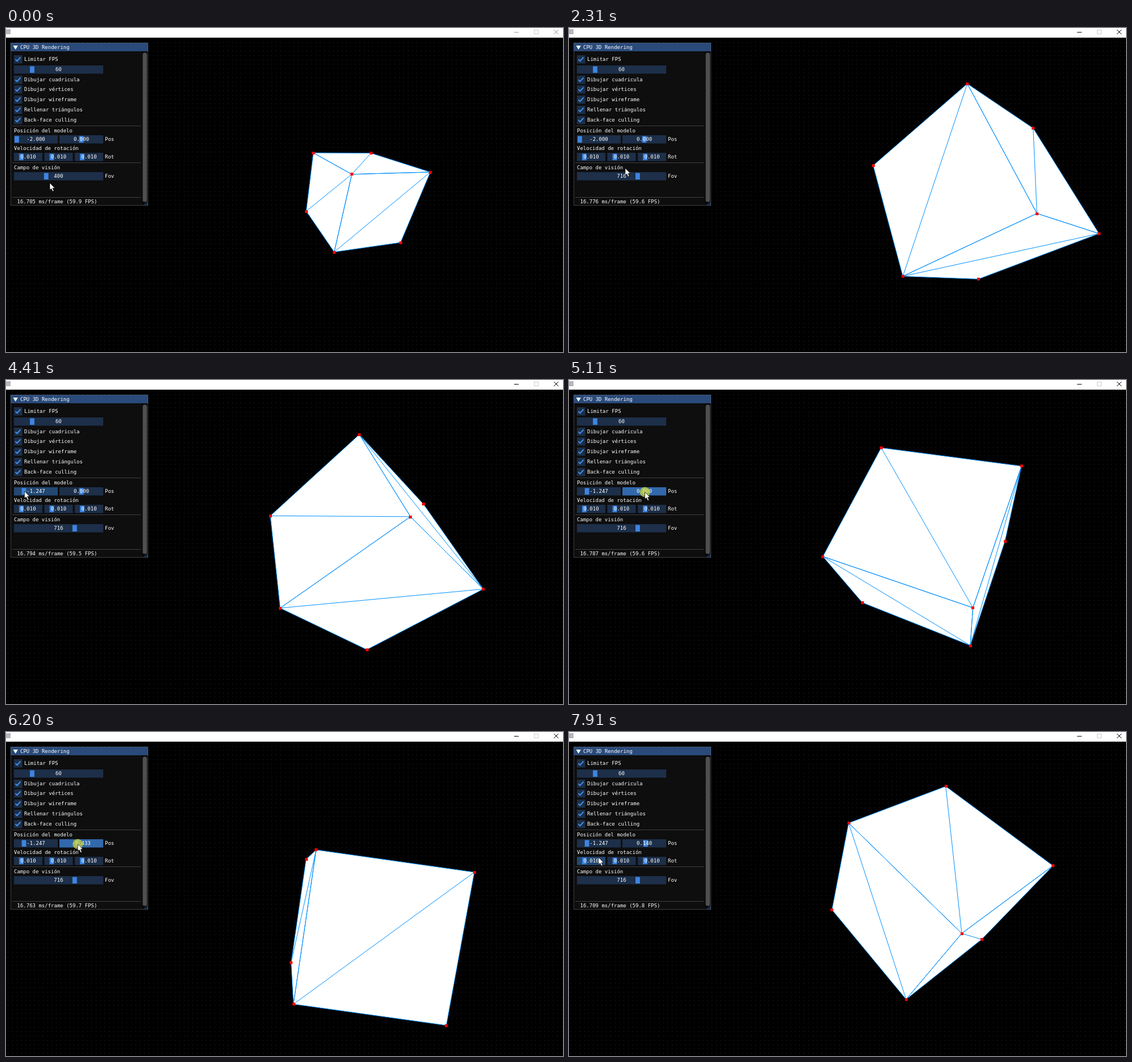
An HTML page with a canvas for the animation above (8000 ms loop, 980 by 571 pixels).

```html
<!DOCTYPE html>
<html lang="es">
<head>
<meta charset="utf-8">
<title>CPU 3D Rendering</title>
<style>
html, body { margin: 0; width: 100%; height: 100%; overflow: hidden; background: #000; }
canvas { display: block; }
</style>
</head>
<body>
<canvas id="stage" width="980" height="571"></canvas>
<script>
const W = 980, H = 571, LOOP = 8000, STEP = 100;
const SCALE = 0.7733, CX = 490.5, CY = 295.7, BAR = 17;
const BORDER = 'rgba(110,110,128,0.5)';
const ctx = document.getElementById('stage').getContext('2d');

const clamp = p => Math.min(1, Math.max(0, p));
const smooth = (t, from, to) => {
  const p = clamp((t - from) / (to - from));
  return p * p * (3 - 2 * p);
};
const easeOut = (t, from, to) => 1 - (1 - clamp((t - from) / (to - from))) ** 2;

// Everything shown at time t: slider values, cube angle, mouse.
function stateAt(t) {
  const fov = 400 + 316 * easeOut(t, 750, 1545);
  const posX = -2 + 0.753 * easeOut(t, 3250, 3800);
  const posY = 0.744 * smooth(t, 5200, 5600) - 1.52 * smooth(t, 5750, 6400) + 0.916 * smooth(t, 6450, 6850);
  const knobs = {
    fov: 70.7 + (fov - 400) * 0.1588,
    posX: 19 + (posX + 2) * 16.7,
    posY: 132.5 + posY * 16.7
  };

  let mouse = [77, 273];
  const moveTo = (x, y, from, to) => {
    const p = smooth(t, from, to);
    mouse = [mouse[0] + (x - mouse[0]) * p, mouse[1] + (y - mouse[1]) * p];
  };
  moveTo(knobs.fov + 1, 262, 100, 600);
  moveTo(knobs.posX + 1, 196, 2100, 2750);
  moveTo(knobs.posY + 1, 197.5, 4450, 4950);
  moveTo(52, 221, 7250, 7800);

  const during = (from, to) => t >= from && t < to;
  const pressed = during(650, 1850) ? 'fov' : during(3200, 3950) ? 'posX' : during(5100, 7150) ? 'posY' : null;
  return {
    fov, posX, posY, knobs, mouse, pressed,
    angle: 4.204 + 0.0006 * t,
    frameMs: 16.705 + 0.09 * Math.sin(Math.PI * t / LOOP),
    focused: t >= 650
  };
}

function rect(x, y, w, h, color) {
  ctx.fillStyle = color;
  ctx.fillRect(x, y, w, h);
}

function path(points, close) {
  ctx.beginPath();
  points.forEach(([x, y]) => ctx.lineTo(x, y));
  if (close) ctx.closePath();
}

function shape(points, color) {
  path(points, true);
  ctx.fillStyle = color;
  ctx.fill();
}

function line(points, color, width = 1) {
  path(points);
  ctx.strokeStyle = color;
  ctx.lineWidth = width;
  ctx.stroke();
}

function text(str, x, y, align = 'left') {
  ctx.font = '9px "DejaVu Sans Mono", monospace';
  ctx.textAlign = align;
  ctx.fillStyle = '#fff';
  ctx.fillText(str, x, y + 3.3);
}

function makeGrid() {
  const grid = document.createElement('canvas'), gap = 10 * SCALE;
  grid.width = W;
  grid.height = H;
  const g = grid.getContext('2d');
  g.fillStyle = '#303030';
  for (let y = BAR; y < H; y += gap)
    for (let x = CX - 640 * SCALE; x < W; x += gap) g.fillRect(Math.round(x), Math.round(y), 1, 1);
  return grid;
}

// Corners are numbered by the bits x, y, z; each face is split from its first to its third corner.
function makeFaces() {
  const faces = [];
  for (let axis = 0; axis < 3; axis++)
    for (const side of [0, 1]) {
      const u = 1 << (axis + 1) % 3, v = 1 << (axis + 2) % 3;
      const face = [0, u, u + v, v].map(i => i + (side << axis));
      if ((side === 1) === (axis === 0)) face.push(face.shift());
      faces.push(face);
    }
  return faces;
}

const GRID = makeGrid(), FACES = makeFaces();

function rotate([x, y, z], angle) {
  const s = Math.sin(angle), c = Math.cos(angle);
  [y, z] = [y * c - z * s, y * s + z * c];
  [x, z] = [x * c - z * s, x * s + z * c];
  [x, y] = [x * c - y * s, x * s + y * c];
  return [x, y, z];
}

function drawCube({ angle, fov, posX, posY }) {
  const focal = fov * SCALE, center = [-posX, -posY, 5];
  const corners = [...Array(8).keys()].map(i =>
    rotate([i & 1, i >> 1 & 1, i >> 2].map(b => 2 * b - 1), angle).map((v, k) => v + center[k]));
  const points = corners.map(([x, y, z]) => [CX + focal * x / z, CY + focal * y / z]);
  const visible = FACES.filter(face => {
    const mid = center.map((_, k) => face.reduce((sum, i) => sum + corners[i][k], 0) / 4);
    return mid.reduce((dot, v, k) => dot + v * (v - center[k]), 0) < 0;
  });

  ctx.save();
  ctx.beginPath();
  ctx.rect(0, BAR, W, H - BAR);
  ctx.clip();
  for (const face of visible) shape(face.map(i => points[i]), '#fff');
  for (const face of visible)
    line([...face, face[0], face[2]].map(i => points[i]), '#0090ff');
  for (const i of new Set(visible.flat()))
    rect(Math.round(points[i][0] - 2.3), Math.round(points[i][1] - 2.3), 5, 5, '#f00');
  ctx.restore();
}

function drawTitleBar(focused) {
  const ink = focused ? '#000' : '#999';
  rect(0, 0, W, BAR, '#fff');
  rect(0, 2, 8, 9, '#b4b8bc');
  line([[894, 7.5], [902, 7.5]], ink);
  ctx.strokeStyle = '#ccc';
  ctx.strokeRect(929.5, 3.5, 7, 7);
  line([[964, 3], [972, 11]], ink);
  line([[972, 3], [964, 11]], ink);
}

function drawCheckbox(label, y) {
  rect(14, y - 7, 14.5, 14.5, '#1d2f49');
  line([[16.5, y + 0.3], [19.5, y + 3.2], [25.5, y - 3.4]], '#4296fa', 1.8);
  text(label, 32, y);
}

function drawSlider(id, x, y, w, value, knob, { mouse, pressed }) {
  const inside = mouse[0] >= x && mouse[0] < x + w && Math.abs(mouse[1] - y) <= 7;
  const active = pressed === id, hover = !pressed && inside;
  rect(x, y - 7, w, 14.5, active ? '#3169ac' : hover ? '#234872' : '#1d2f49');
  rect(knob - 3.9, y - 5.5, 7.8, 11.5, active ? '#4296fa' : '#3d85e0');
  text(value, x + w / 2, y, 'center');
}

function drawPanel(state) {
  const { fov, posX, posY, knobs, frameMs } = state;
  rect(8, 26, 242, 287, '#0e0e0e');
  rect(8, 26, 242, 15, '#294a7a');
  shape([[12.5, 31], [21, 31], [16.7, 38]], '#fff');
  text('CPU 3D Rendering', 25, 34);

  rect(239, 41, 10, 271, '#0a0a0a');
  shape([[250, 304], [250, 313], [241, 313]], '#18293d');
  ctx.beginPath();
  ctx.roundRect(240.5, 43.5, 7.5, 263, 3.5);
  ctx.fillStyle = '#4f4f4f';
  ctx.fill();
  ctx.strokeStyle = BORDER;
  ctx.lineWidth = 1;
  ctx.strokeRect(8.5, 26.5, 241, 286);

  ['Limitar FPS', '', 'Dibujar cuadricula', 'Dibujar vértices', 'Dibujar wireframe', 'Rellenar triángulos', 'Back-face culling']
    .forEach((label, i) => label && drawCheckbox(label, Math.round(55 + i * 17.8)));
  for (const y of [172.5, 237.5, 298.5]) line([[11, y], [237, y]], BORDER);

  text('Posición del modelo', 14, 181);
  text('Velocidad de rotación', 14, 212);
  text('Campo de visión', 14, 245.5);
  text('Pos', 174, 196);
  text('Rot', 174, 227);
  text('Fov', 174, 261);

  drawSlider('fps', 14, 73, 157, '60', 46, state);
  drawSlider('posX', 14, 196, 77, posX.toFixed(3), knobs.posX, state);
  drawSlider('posY', 94, 196, 77, posY.toFixed(3), knobs.posY, state);
  for (let i = 0; i < 3; i++) {
    const x = 14 + i * 53.5;
    drawSlider('rot' + i, x, 227, 50, '0.010', x + 13, state);
  }
  drawSlider('fov', 14, 261, 157, fov.toFixed(0), knobs.fov, state);
  text(`${frameMs.toFixed(3)} ms/frame (${(1000 / frameMs).toFixed(1)} FPS)`, 19.5, 306);
}

function drawCursor({ mouse: [x, y], pressed }) {
  if (pressed) {
    ctx.beginPath();
    ctx.arc(x, y, 9, 0, 7);
    ctx.fillStyle = 'rgba(214,214,40,0.7)';
    ctx.fill();
  }
  const arrow = [[0, 0], [0, 12.5], [2.8, 10], [5, 15], [7.2, 14], [5, 9.2], [9, 9.2]];
  shape(arrow.map(([dx, dy]) => [x + dx, y + dy]), '#fff');
  ctx.strokeStyle = '#000';
  ctx.lineWidth = 0.7;
  ctx.stroke();
}

function draw(now) {
  // The picture advances in steps, like a screen recording.
  const state = stateAt(Math.floor(now % LOOP / STEP) * STEP);
  rect(0, 0, W, H, '#000');
  ctx.drawImage(GRID, 0, 0);
  drawCube(state);
  drawTitleBar(state.focused);
  drawPanel(state);
  drawCursor(state);
}

const start = performance.now();
function loop() {
  draw(performance.now() - start);
  requestAnimationFrame(loop);
}
loop();
</script>
</body>
</html>
```
